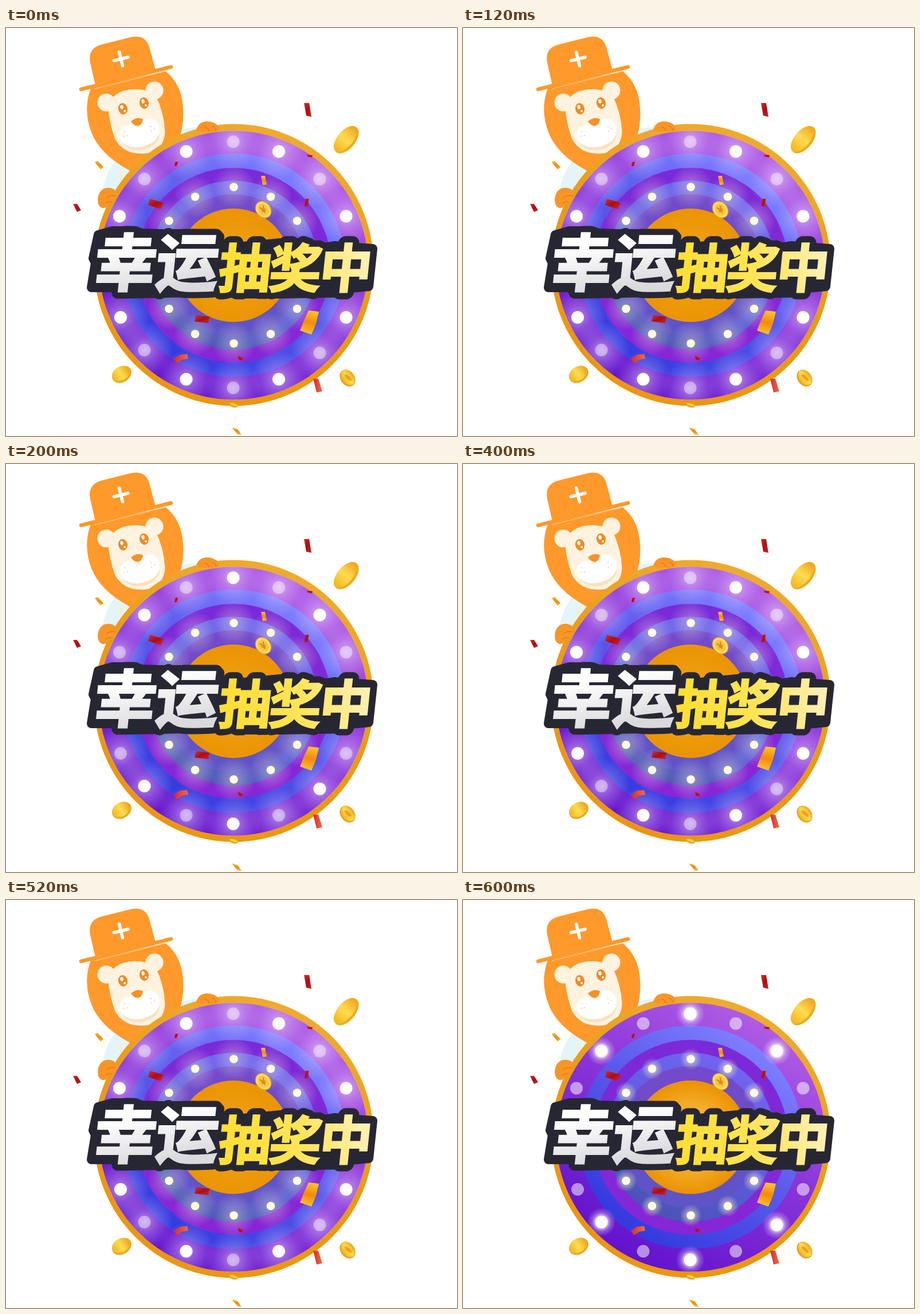
These frames come from a looping animation (787x712 px, 800 ms). An HTML page:

```html
<!DOCTYPE html>
<html lang="zh">
<head>
<meta charset="utf-8">
<title>幸运抽奖中</title>
<style>
html, body { margin: 0; height: 100%; overflow: hidden; background: #fff; }
svg { display: block; width: 787px; height: 712px; }
text { text-anchor: middle; font-family: "Noto Sans CJK SC", "Noto Sans CJK", "Noto Sans CJK JP", sans-serif; font-weight: 900; }
#edge { fill: #272734; stroke: #272734; stroke-width: 25; stroke-linejoin: round; }
#white { fill: url(#silver); stroke: url(#silver); stroke-width: 3.5; }
#gold { fill: url(#yellow); stroke: url(#yellow); stroke-width: 3; }
</style>
</head>
<body>
<svg viewBox="0 0 787 712">
  <defs>
    <linearGradient id="rim" x1=".7" y1="0" x2=".3" y2="1"><stop stop-color="#efac30"/><stop offset=".5" stop-color="#e99a16"/><stop offset="1" stop-color="#ec9512"/></linearGradient>
    <linearGradient id="violet" x1=".8" y1=".05" x2=".25" y2=".95"><stop stop-color="#b25fe6"/><stop offset=".45" stop-color="#8a35da"/><stop offset="1" stop-color="#6112cc"/></linearGradient>
    <linearGradient id="blue" x1=".85" y1=".1" x2=".25" y2=".9"><stop stop-color="#8080ff"/><stop offset=".5" stop-color="#5a58ea"/><stop offset="1" stop-color="#363bdf"/></linearGradient>
    <linearGradient id="purple" x1="0" y1="0" x2="0" y2="1"><stop stop-color="#7a2ad8"/><stop offset="1" stop-color="#8726d6"/></linearGradient>
    <linearGradient id="slate" x1=".8" y1=".1" x2=".35" y2="1"><stop stop-color="#7164ef"/><stop offset=".55" stop-color="#5c5bdd"/><stop offset="1" stop-color="#4b53b2"/></linearGradient>
    <linearGradient id="plum" x1=".5" y1="0" x2=".5" y2="1"><stop stop-color="#7449cb"/><stop offset="1" stop-color="#5d55c6"/></linearGradient>
    <radialGradient id="hub"><stop stop-color="#ffcf58"/><stop offset=".5" stop-color="#f6b130"/><stop offset="1" stop-color="#ea9200"/></radialGradient>
    <radialGradient id="haze"><stop stop-color="#fff" stop-opacity=".5"/><stop offset=".4" stop-color="#f0dcff" stop-opacity=".28"/><stop offset="1" stop-color="#e6ceff" stop-opacity="0"/></radialGradient>
    <radialGradient id="mist"><stop offset=".2" stop-color="#fff8d8" stop-opacity=".3"/><stop offset="1" stop-color="#fff8d8" stop-opacity="0"/></radialGradient>
    <radialGradient id="glow"><stop offset=".4" stop-color="#fff" stop-opacity=".75"/><stop offset=".65" stop-color="#fff" stop-opacity=".28"/><stop offset="1" stop-color="#fff" stop-opacity="0"/></radialGradient>
    <radialGradient id="warm"><stop offset=".35" stop-color="#fff8c8" stop-opacity=".45"/><stop offset="1" stop-color="#fff8c8" stop-opacity="0"/></radialGradient>
    <linearGradient id="silver" gradientUnits="userSpaceOnUse" x1="240" y1="375" x2="255" y2="460"><stop stop-color="#fff"/><stop offset="1" stop-color="#dadadc"/></linearGradient>
    <linearGradient id="yellow" gradientUnits="userSpaceOnUse" x1="395" y1="455" x2="630" y2="395"><stop stop-color="#ffdf35"/><stop offset=".5" stop-color="#ffe458"/><stop offset="1" stop-color="#fff1b8"/></linearGradient>
    <linearGradient id="coin"><stop stop-color="#f3b51e"/><stop offset=".5" stop-color="#ffdc50"/><stop offset="1" stop-color="#eda51d"/></linearGradient>
    <linearGradient id="red" x1="0" y1="0" x2="1" y2="1"><stop stop-color="#df2920"/><stop offset=".5" stop-color="#a90f13"/><stop offset="1" stop-color="#d4251c"/></linearGradient>
    <linearGradient id="coral"><stop stop-color="#d82c22"/><stop offset="1" stop-color="#f46a4c"/></linearGradient>
    <linearGradient id="amber" x1=".6" y1="0" x2=".4" y2="1"><stop stop-color="#ffc32b"/><stop offset=".5" stop-color="#f28a0d"/><stop offset="1" stop-color="#ffc332"/></linearGradient>
    <clipPath id="disc"><circle cx="397" cy="414" r="235"/></clipPath>
  </defs>

  <g id="lion">
    <path fill="#e3f5fb" d="M167 292Q172 255 190 233L218 248 202 292ZM300 180Q318 172 340 174L330 190 298 204Z"/>
    <path fill="#fdecc9" d="M199 250l5 2-1 13-4 3z"/>
    <path fill="#ff992b" d="M148 105Q134 142 149 182 164 221 216 249L291 222Q312 180 309 140 307 98 278 75Z"/>
    <path fill="#ff992b" d="M156 100L147 61Q142 36 166 29L218 16Q243 11 250 33L261 74Z"/>
    <path stroke="#ff992b" stroke-width="6.5" stroke-linecap="round" d="M131 107L288 68"/>
    <path stroke="#fff3e2" stroke-width="1" stroke-dasharray="2 1" d="M155 106L278 75.500"/>
    <path stroke="#fff" stroke-width="5.500" stroke-linecap="round" d="M188.500 57L213 51M197.500 42L203.500 66"/>
    <g fill="#fff3e0">
      <circle cx="175" cy="130" r="15.500"/><circle cx="259" cy="109" r="15.500"/>
      <path d="M178 139Q182 118 204 110 236 101 261 117 276 149 277.500 181 276 214 243 219 205 222 190 193 181 168 178 139Z"/>
    </g>
    <path fill="#fbe1bf" d="M200 196Q212 217 239 213 265 207 269 184L260 196 225 207Z"/>
    <g fill="#fff">
      <circle cx="216" cy="187" r="18"/><circle cx="250" cy="176" r="18"/>
      <ellipse cx="236" cy="190" rx="31" ry="17" transform="rotate(-15 236 190)"/>
    </g>
    <path fill="#f79027" d="M218 163Q228 154 239 159 238 168 231 171 222 170 218 163Z"/>
    <g id="eyes"></g>
    <path stroke="#f5c995" stroke-width="2" stroke-linecap="round" d="M207 181h.1M212 188h.1M206 189h.1M253 172h.1M259 176h.1M254 180h.1"/>
  </g>

  <g id="wheel"><ellipse cx="397.500" cy="413.500" rx="244" ry="246" fill="url(#rim)"/></g>
  <g id="lamps" clip-path="url(#disc)"></g>

  <g fill="#f99527" stroke="#d97b17" stroke-width="1.300" stroke-linecap="round">
    <path stroke="none" d="M165 285Q174 275 188 281 194 286 191 292 194 299 185 303 178 304 175 313 165 317 161 307 158 294 165 285ZM332 178Q335 164 350 163 364 163 371 172 374 179 367 179 360 183 353 180 342 184 332 178Z"/>
    <path fill="none" d="M191 293Q181 291 176 296M184 303Q177 302 174 306M367 179Q365 173 359 171M354 180Q353 174 347 173"/>
  </g>

  <g id="bits"></g>

  <path fill="#272734" stroke="#272734" stroke-width="16" stroke-linejoin="round" d="M161 361L186 354H226L236 358 268 359H368L373 364 371 384 398 378 414 381 478 375H513L548 384 574 380 640 385 633 451 601 454 597 462 480 464H400L366 457 310 462 214 464H200L194 453H149L156 410 152 402Z"/>
  <g id="edge"></g>
  <g id="white"></g>
  <g id="gold"></g>
</svg>
<script>
const $ = id => document.getElementById(id);
const add = (id, html) => $(id).insertAdjacentHTML('beforeend', html);
const circle = (x, y, r, fill, cls = '') =>
  `<circle cx="${x}" cy="${y}" r="${r}" fill="${fill}" class="${cls}"/>`;
const oval = (x, y, rx, ry, turn, fill) =>
  `<ellipse rx="${rx}" ry="${ry}" fill="${fill}" transform="translate(${x} ${y}) rotate(${turn})"/>`;

for (const [x, y] of [[204, 141], [241, 131]])
  add('eyes', oval(x, y, 8, 10, -12, '#f18b23') + oval(x - 2, y - 3, 2.7, 3.7, -12, '#fff') +
    circle(x + 3, y + 4, 2, '#fff'));

// Wheel bands, outermost first
for (const [r, fill] of [[234.5, 'violet'], [195, 'blue'], [170, 'purple'], [147.5, 'slate'], [124, 'plum']])
  add('wheel', circle(397, 414, r, `url(#${fill})`));
add('wheel', circle(397, 414, 99, '#eb9503') + circle(397, 414, 99, 'url(#hub)', 'hub'));

// Outer lamps in two sets that light in turn
const lamps = [
  [[396.5, 198.5], [547.5, 263.5], [547.5, 567], [396.5, 628], [241.5, 562], [241.5, 263.5]],
  [[476, 215.5], [593.5, 328.5], [593.5, 505], [476, 613], [314.5, 613], [200, 505], [198, 328.5], [314.5, 215.5]]
];
lamps.forEach((set, i) => set.forEach(([x, y]) =>
  add('lamps', circle(x, y, 50, 'url(#haze)', 'haze') + circle(x, y, 25, 'url(#glow)', 'crisp set' + i))));
lamps.forEach((set, i) => set.forEach(([x, y]) => add('lamps', circle(x, y, 11, '#fff', 'bulb set' + i))));

const inner = [[397.5, 277.5], [462, 294.5], [508, 336.5], [508, 490], [462, 534], [397.5, 550.5],
  [330, 534], [284.5, 490], [284.5, 336.5], [330, 294.5]];
for (const [x, y] of inner)
  add('lamps', circle(x, y, 38, 'url(#mist)', 'haze') + circle(x, y, 19, 'url(#warm)', 'crisp'));
for (const [x, y] of inner) add('lamps', circle(x, y, 7.3, '#fffbdc'));

// Confetti and coins
const confetti = {
  red: ['520 131 529 131 533 155 524 153', '117 307 124 307 131 318 124 321',
    '295 234 300 233 298 241 294 241', '251 298 275 305 270 316 248 309',
    '525 221 535 222 534 226 526 224', '522 298 528 298 527 311 521 311',
    '332 501 355 504 353 515 329 512', '404 571 414 577 412 581 406 578'],
  coral: ['293 577 304 570 316 569 318 577 307 579 298 585', '536 612 545 612 552 634 542 636'],
  amber: ['155 234 160 232 170 243 165 247', '445 258 452 258 455 273 448 274',
    '528 493 546 495 541 516 533 535 513 528 520 510', '394 697 404 700 411 710 404 709']
};
for (const tone in confetti)
  for (const points of confetti[tone])
    add('bits', `<polygon points="${points}" fill="url(#${tone})"/>`);
add('bits', oval(594, 195, 28, 15.5, -50, '#edab22') + oval(592, 193.5, 27, 13.5, -50, 'url(#coin)') +
  oval(202, 604.5, 18, 13.5, -32, '#e9a722') + oval(200.5, 603, 16.5, 12, -32, 'url(#coin)') +
  oval(596, 611, 12, 16, -38, '#e8a21d') + oval(597, 610, 10.5, 14.5, -38, 'url(#coin)') +
  oval(597, 610, 3, 8, -48, '#eba321') +
  oval(397, 658.5, 8, 3.5, 15, '#e9a51c') + oval(397, 657, 7, 2, 15, '#ffd34b') +
  oval(449, 317, 13, 16, -38, '#eda922') + oval(449, 317, 11.5, 14.5, -38, '#ffe06b') +
  oval(449, 317, 9, 11.5, -38, '#f8c744') +
  '<text transform="translate(449 317) rotate(-30)" y="6" font-size="17" fill="#d9820e">¥</text>');

// Slanted lettering: each group leans about its baseline
const slope = Math.tan(6 * Math.PI / 180);
function word(group, chars, xs, y, size) {
  const lean = `<g transform="matrix(1 0 ${-slope} 1 ${slope * y} 0)">` +
    [...chars].map((c, i) => `<text x="${xs[i]}" y="${y}" font-size="${size}">${c}</text>`).join('') + '</g>';
  add('edge', lean);
  add(group, lean);
}
word('white', '幸运', [205, 313], 450, 109);
word('gold', '抽奖中', [414, 502, 590], 453.5, 91);

const fade = (selector, value) =>
  document.querySelectorAll(selector).forEach(el => el.style.opacity = value);
let last = -1;
function tick() {
  const step = Math.floor(performance.now() % 800 / 200);
  if (step !== last) {
    last = step;
    const lit = 1 - step % 2, crisp = step === 3;
    fade('.haze', crisp ? 0 : 1);
    fade('.crisp', crisp ? 1 : 0);
    fade('.crisp.set' + (1 - lit), 0);
    fade('.bulb.set' + lit, 1);
    fade('.bulb.set' + (1 - lit), crisp ? .52 : .42);
    fade('.hub', crisp ? 1 : .25);
  }
  requestAnimationFrame(tick);
}
tick();
</script>
</body>
</html>
```
